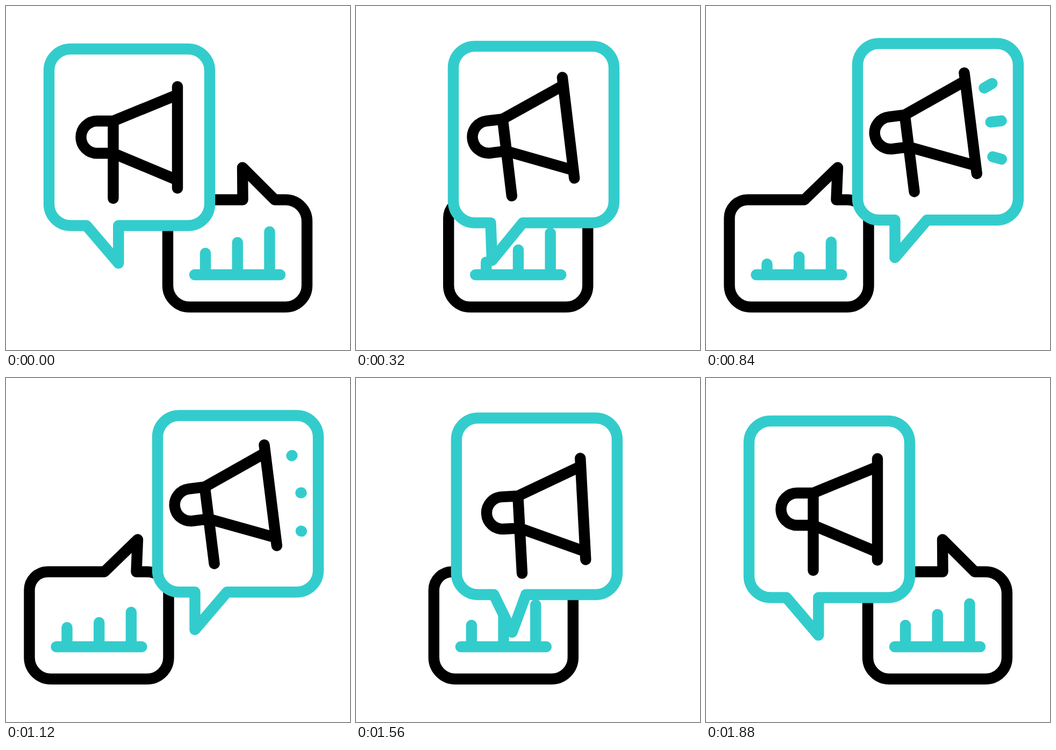
Write an HTML page that moves like this. It is 640 px wide and 640 px high and loops after 2 s.

```html
<!DOCTYPE html>
<html lang="en">
<head>
<meta charset="utf-8">
<title>Promotion chat</title>
<style>
  html, body { margin: 0; width: 100%; height: 100%; overflow: hidden; background: #fff; }
  svg { display: block; width: 100vw; height: 100vh; }
  path { fill: none; stroke-width: 20.4; stroke-linecap: round; stroke-linejoin: round; }
  .teal { stroke: #33cccc; }
  .black { stroke: #000; }
  .filled { fill: #fff; }
</style>
</head>
<body>
<svg viewBox="0 0 640 640">
  <g id="chart">
    <path id="chartBubble" class="black filled"/>
    <path id="bars" class="teal"/>
  </g>
  <g id="promo">
    <path id="promoBubble" class="teal filled"/>
    <g id="horn">
      <path class="black" d="M319 150V339M199.5 214V358M319 165L199.5 214H169.5a30 30 0 0 0 0 60H199.5L319 324"/>
      <path id="sound" class="teal"/>
    </g>
  </g>
</svg>
<script>
const LOOP = 2000, STEP = 40, START = 40;
const el = id => document.getElementById(id);

// Eased progress from 0 to 1 between two times
function ease(t, from, to) {
  const u = Math.min(1, Math.max(0, (t - from) / (to - from)));
  return u * u * (3 - 2 * u);
}

// Goes out until one time, waits, then comes back between two others
const swing = (t, out, from, to) => ease(t, START, out) - ease(t, from, to);

// Curve that starts at 0
const bezier = (b, c, d, s) =>
  3 * (1 - s) ** 2 * s * b + 3 * (1 - s) * s * s * c + s ** 3 * d;

// How far each bar has sunk at three shared times, and when it rests again
const bars = [
  { sink: [21, -16, 24], end: 1200 },
  { sink: [16, -2, 30], end: 1340 },
  { sink: [0, 20, 19], end: 1720 }
];

function sunk(t, { sink: [a, b, c], end }) {
  return a * ease(t, START, 240) + (b - a) * ease(t, 240, 600) +
    (c - b) * ease(t, 600, 900) - c * ease(t, 900, end);
}

function drawChart(t) {
  const x = -257.5 * swing(t, 600, 1320, 1880);
  const tip = 440 + 62.5 * swing(t, 360, 1288, 1728);
  el("chart").setAttribute("transform", `translate(${x} 0)`);
  el("chartBubble").setAttribute("d",
    `M335 360.5H440.5L${tip} 300.5L500 360.5H520A40 40 0 0 1 560 400.5V520` +
    "A40 40 0 0 1 520 560H341A40 40 0 0 1 301 520V394.5A34 34 0 0 1 335 360.5Z");
  el("bars").setAttribute("d", "M351 500H510" + bars.map((bar, i) =>
    `M${371 + 59.7 * i} ${460 - 20 * i + sunk(t, bar)}V500`).join(""));
}

// Rays fan out symmetrically in front of the horn
function ray(i, tail, head) {
  const angle = i * Math.PI / 8, length = 20 - 3 * Math.abs(i);
  const point = p => {
    const back = (1 - p) * length;
    return `${376.5 - 8.5 * Math.abs(i) - back * Math.cos(angle)} ${247 + 71 * i - back * Math.sin(angle)}`;
  };
  return `M${point(tail)}L${point(head)}`;
}

function drawPromo(t) {
  const move = swing(t, 600, 1264, 1880);
  const turn = swing(t, 360, 1328, 1752);
  const slide = swing(t, 380, 1160, 1760);
  el("promo").setAttribute("transform", `translate(${202 * move} ${-10.3 * move})`);
  el("promoBubble").setAttribute("d",
    `M120 80H339A40 40 0 0 1 379 120V368.5A40 40 0 0 1 339 408.5H209.3L${209.3 - 59.8 * turn} 478.5` +
    "L149.5 408.5H120A40 40 0 0 1 80 368.5V120A40 40 0 0 1 120 80Z");

  const x = bezier(-2, -11, -27, slide), y = bezier(20, 6, -5, slide);
  el("horn").setAttribute("transform", `translate(${x} ${y}) rotate(${-7.1 * turn} 229 254)`);

  const head = ease(t, 440, 600), tail = ease(t, 880, 1160);
  el("sound").setAttribute("d",
    head > tail ? [-1, 0, 1].map(i => ray(i, tail, head)).join("") : "");
}

const start = performance.now();
function frame() {
  const t = Math.floor(((performance.now() - start) % LOOP) / STEP) * STEP;
  drawChart(t);
  drawPromo(t);
  requestAnimationFrame(frame);
}
frame();
</script>
</body>
</html>
```
